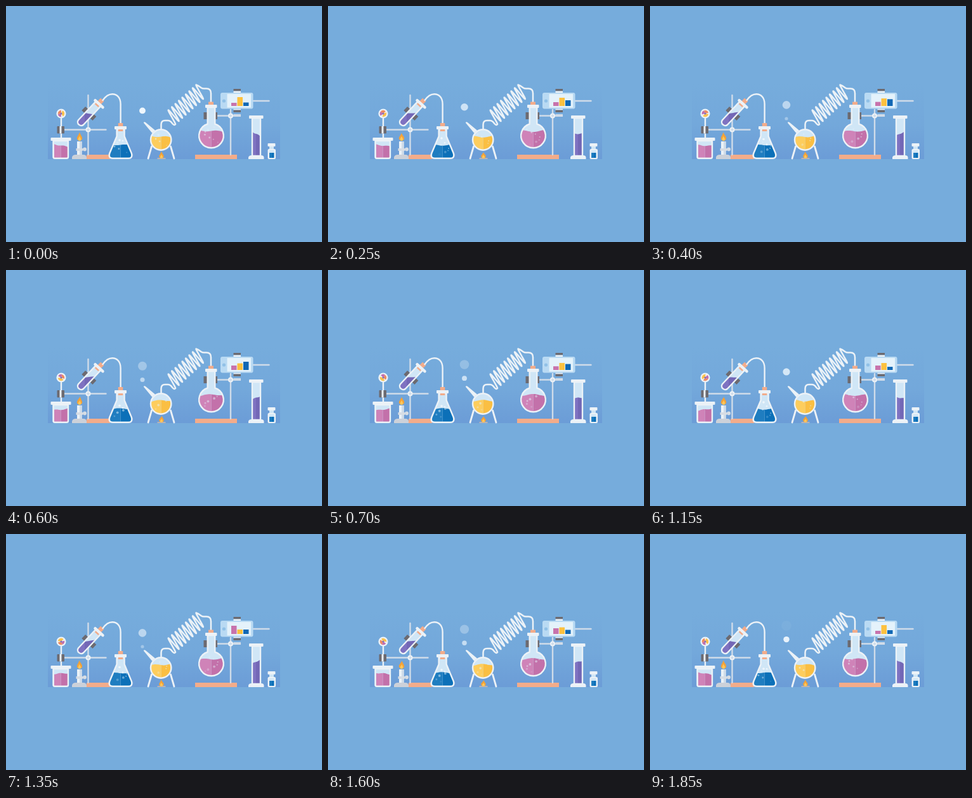
Recreate the animation shown at these times as an HTML page with a canvas. Size 498 by 373 pixels, loop 1.9 s.

```html
<!DOCTYPE html>
<html lang="en">
<head>
<meta charset="utf-8">
<title>Laboratory</title>
<style>
html, body { margin: 0; width: 100%; height: 100%; overflow: hidden; background: #76acdc; }
canvas { display: block; }
</style>
</head>
<body>
<canvas id="stage" width="498" height="373"></canvas>
<script>
const c = document.getElementById('stage').getContext('2d');
const LOOP = 1900, HALF = 950, TAU = Math.PI * 2;
const WHITE = '#ecf2f7', GLASS = '#d0e6f6', ROD = '#d0dce9', DARK = '#6c6a70', ORANGE = '#f3ac8a';
const PINK = ['#cf83b8', '#c371aa'], BLUE = ['#1f7dc0', '#0c70b8'],
  YELLOW = ['#fdcd5d', '#fabf43'], PURPLE = ['#7f72c1', '#7367b6'];

function rect(color, x, y, w, h, r = 0) {
  c.fillStyle = color;
  c.beginPath();
  c.roundRect(x, y, w, h, r);
  c.fill();
}

function disc(color, x, y, r, alpha = 1) {
  c.globalAlpha = alpha;
  c.fillStyle = color;
  c.beginPath();
  c.arc(x, y, r, 0, TAU);
  c.fill();
  c.globalAlpha = 1;
}

function shape(d, color) {
  c.fillStyle = color;
  c.fill(new Path2D(d));
}

function line(d, color = WHITE, width = 2.4, cap = 'round') {
  c.strokeStyle = color;
  c.lineWidth = width;
  c.lineCap = cap;
  c.lineJoin = 'round';
  c.stroke(new Path2D(d));
}

// Linear interpolation through [time, value] pairs, closed over the loop.
function track(t, keys) {
  const i = keys.findLastIndex(k => k[0] <= t);
  const [t0, v0] = keys[i];
  const [t1, v1] = keys[i + 1] || [LOOP, keys[0][1]];
  return v0 + (v1 - v0) * (t - t0) / (t1 - t0);
}

// Glass outline with a rocking liquid of two tones, split at the middle.
function vessel(d, t, { x0, x1, level, bottom, tones, tilt, mid = (x0 + x1) / 2, ripple = 0, bubbles = 0, period = HALF }) {
  const path = new Path2D(d), angle = TAU * t / period;
  c.fillStyle = GLASS;
  c.fill(path);
  c.save();
  c.clip(path);
  const surface = x => {
    const u = (x - x0) / (x1 - x0);
    return level + tilt * Math.cos(angle) * (u * 2 - 1) + ripple * Math.sin(u * TAU - angle);
  };
  [[x0, mid], [mid, x1]].forEach(([a, b], i) => {
    c.fillStyle = tones[i];
    c.beginPath();
    c.moveTo(a, bottom);
    for (let k = 0; k <= 10; k++) {
      const x = a + (b - a) * k / 10;
      c.lineTo(x, surface(x));
    }
    c.lineTo(b, bottom);
    c.fill();
  });
  for (let i = 0; i < bubbles; i++) {
    const p = (t / HALF + i * 0.382) % 1;
    const x = mid + (x1 - x0) * 0.28 * Math.sin(i * 2.4 + 1);
    const y = bottom - 5 - p * (bottom - level + 4);
    disc('#e5f2fb', x, y, 1 + i % 3 * 0.45, 0.5 * Math.sin(p * Math.PI));
  }
  c.restore();
  line(d);
}

function flame(x, y, h, w, t) {
  const tip = x + 0.8 * Math.sin(TAU * t / 475), top = y - h - 0.7 * Math.cos(TAU * t / 475);
  const drop = (k, color) => shape(
    `M${tip} ${y - (y - top) * k}C${x + w * k * 0.3} ${y - h * k * 0.65} ${x + w * k} ${y - h * k * 0.5} ${x + w * k * 0.8} ${y - h * k * 0.22}` +
    `Q${x} ${y + h * k * 0.16} ${x - w * k * 0.8} ${y - h * k * 0.22}C${x - w * k} ${y - h * k * 0.5} ${x - w * k * 0.3} ${y - h * k * 0.65} ${tip} ${y - (y - top) * k}`, color);
  drop(1, '#f3a238');
  drop(0.58, '#fdc75b');
}

function dial(t) {
  disc(WHITE, 87, 170, 7.6);
  const turn = TAU * t / LOOP;
  [['#c16fae', 1.6, 1.4], ['#ee8a62', 3, 1.7], ['#fbc24d', 5.1, 2.2]].forEach(([color, from, sweep]) => {
    c.fillStyle = color;
    c.beginPath();
    c.moveTo(87, 170);
    c.arc(87, 170, 5.2, from + turn, from + turn + sweep);
    c.fill();
  });
  disc('#8073c0', 87, 170, 1.6);
}

function backdrop() {
  rect('#76acdc', 0, 0, 498, 373);
  const g = c.createLinearGradient(0, 123, 0, 242);
  g.addColorStop(0, 'rgba(104,151,213,0)');
  g.addColorStop(0.55, 'rgba(104,151,213,.2)');
  g.addColorStop(1, 'rgba(104,151,213,.75)');
  rect(g, 66, 123, 366, 119);
}

function leftStand(t) {
  rect(ORANGE, 127, 235, 37, 7);
  line('M129.5 141V235M82 195.5H157.5', ROD);
  disc(WHITE, 129.5, 195.5, 4);
  disc(ROD, 129.5, 195.5, 2);

  line('M87 178V208');
  rect(DARK, 80.5, 190, 11.5, 11.5, 1);
  rect(WHITE, 84.5, 190, 3, 11.5);
  dial(t);
  vessel('M74.5 213V238.5Q74.5 240.8 77 240.8H95.5Q98 240.8 98 238.5V213Z', t,
    { x0: 76, x1: 97, level: 220.5, bottom: 240, tones: PINK, tilt: 2.2, ripple: 0.8, period: LOOP });
  rect(WHITE, 70.5, 208, 32, 5, 1);

  shape('M104 242V239Q105 235 110 235H122Q126.5 235 127 239V242Z', '#ccd1d9');
  rect(WHITE, 112, 214, 7.5, 21);
  rect(ROD, 116, 214, 3.5, 21);
  rect('#d7dde4', 110.5, 225, 10.5, 4);
  disc('#d7dde4', 124, 226.5, 3);
  flame(116, 213.5, 13.5, 5, t);

  line('M122.2 162L127.4 166.8M134 172.8L139.4 177.8', DARK, 8.5, 'butt');
  vessel('M141 151.3L114 180.3A5.5 5.5 0 0 0 122 187.7L149 158.7Z', t,
    { x0: 112, x1: 142, level: 169.5, bottom: 191, tones: PURPLE, tilt: 2.5, mid: 124 });
  line('M142.5 157.5L151.8 148', ORANGE, 7.5, 'butt');
  line('M140.5 149.2L152.5 160.2', WHITE, 4.5);
  line('M152.5 149C157 142.5 162 139.2 167.5 139.2C176 139.2 180.6 146 180.6 155V186');
}

function conical(t) {
  vessel('M174.6 195V206L163.6 232C161.5 237 163 240.8 168 240.8H193C198 240.8 199.6 237 197.5 232L186.6 206V195Z', t,
    { x0: 162, x1: 199, level: 219.5, bottom: 240, tones: BLUE, tilt: 1.6, ripple: 1.3, bubbles: 6 });
  disc('#f5fafd', 179, 212 - 3 * Math.sin(TAU * t / HALF), 1.8, 0.8);
  disc('#f5fafd', 184, 216 - 3 * Math.cos(TAU * t / HALF), 1.3, 0.7);
  rect(ORANGE, 176.8, 185, 7.5, 13);
  rect(WHITE, 171, 190, 19, 5, 1);
}

function coil() {
  let d = 'M244.5 197V187.5Q244.5 181 250.5 181H255Q259 181 262 185.5Q265 189.5 267 187';
  const turns = 8.5, steps = 170;
  for (let i = 0; i <= steps; i++) {
    const u = i / steps, swing = Math.cos(u * turns * TAU);
    d += `L${260 + 46.5 * u + 7 * swing} ${177 - 42.5 * u + 10 * swing}`;
  }
  line(d + 'Q304 126 308 129.5Q309.5 130.5 312 130.5H316Q323 130.5 323 138V153', WHITE, 2.5);
}

function yellowFlask(t) {
  line('M229.5 222L224 241M259.5 222L265 241', WHITE, 2.8);
  shape('M216.8 184.5Q217.8 182.3 220 184L235 196.5L230.5 201Z', WHITE);
  vessel('M228 211.5A16.2 16.2 0 0 1 260.4 211.5A16.2 16.2 0 0 1 228 211.5Z', t,
    { x0: 228, x1: 261, level: 206.5, bottom: 229, tones: YELLOW, tilt: 1.5, ripple: 1.3, bubbles: 5 });
  rect('#b9b3b6', 238.5, 240, 13, 2);
  flame(245, 241, 10.5, 4.5, t);
}

function rightStand(t) {
  rect(ORANGE, 298, 235, 66, 7);
  line('M354 164V235M331 173.5H369', ROD);
  disc(WHITE, 354, 173.5, 4);
  disc(ROD, 354, 173.5, 2);

  rect(DARK, 311.5, 168, 6, 11);
  rect(DARK, 329, 168, 4, 11);
  rect(ORANGE, 319, 151.5, 8, 5);
  vessel('M317.7 160V186.5A19.3 19.3 0 1 0 329.3 186.5V160Z', t,
    { x0: 304, x1: 343, level: 197.5, bottom: 225, tones: PINK, tilt: 1.8, ripple: 1.5, bubbles: 8 });
  rect(WHITE, 314, 156, 18.5, 5, 1);
}

function phone(t) {
  rect(DARK, 358.5, 131, 11.5, 3.5);
  rect(WHITE, 358.5, 134.5, 11.5, 2.5);
  rect(WHITE, 358.5, 162.5, 11.5, 2);
  rect(DARK, 358.5, 164.5, 11.5, 3.5);
  rect(ROD, 358.5, 171, 11.5, 4);
  line('M389 150H414.5', ROD);
  rect('#b9daf3', 338, 137, 51.5, 25.5, 3);
  rect('#e4f2fb', 348.5, 139, 37.5, 21.5);
  disc('#91c1e7', 343.5, 150, 2.6);
  const bars = [
    ['#c873ac', 355, [[0, 5], [250, 6], [600, 7], [850, 4], [1150, 7], [1350, 13], [1850, 5]]],
    ['#fcc13f', 364.5, [[0, 14], [250, 13], [600, 10.5], [850, 12], [1150, 11], [1350, 7], [1850, 14]]],
    ['#1168b4', 374, [[0, 5.5], [250, 9], [600, 13], [850, 4], [1150, 5], [1350, 7], [1850, 6]]]
  ];
  for (const [color, x, keys] of bars) {
    const h = track(t, keys);
    rect(color, x, 158 - h, 8.5, h);
  }
}

function cylinder(t) {
  vessel('M388 177V237H401V177Z', t,
    { x0: 388, x1: 400, level: 202, bottom: 237, tones: PURPLE, tilt: 3.2, ripple: 0.5 });
  rect(WHITE, 383, 173, 22.5, 5, 1);
  shape('M382 242V239Q383 236 387 236H402Q406 236 406.5 239V242Z', WHITE);
}

function bottle() {
  rect(WHITE, 412.5, 217, 12, 5, 1);
  rect(GLASS, 415, 222, 7, 5);
  rect(WHITE, 412.5, 226, 12.5, 16, 2);
  rect(GLASS, 415, 228, 7.5, 5);
  rect(BLUE[0], 415, 232, 4, 8);
  rect(BLUE[1], 418.7, 232, 3.8, 8);
}

// Each bubble lives about 1500 ms; a new one leaves the spout every 950 ms.
function steam(t) {
  for (const age of [t % HALF + HALF - 370, t % HALF - 370]) {
    if (age < 0 || age > 1530) continue;
    const alpha = age < 580 ? 0.35 + 0.65 * age / 580 : 1 - (age - 580) / 950;
    disc('#eff7fd', 215, 178.7 - age * 0.0228, 2.4 + 5.6 * (age / 1500) ** 0.85, alpha);
  }
}

function draw(now) {
  const t = Math.floor(now % LOOP / 50) * 50;
  backdrop();
  leftStand(t);
  conical(t);
  coil();
  yellowFlask(t);
  rightStand(t);
  phone(t);
  cylinder(t);
  bottle();
  steam(t);
}

const start = performance.now();
function tick() {
  draw(performance.now() - start);
  requestAnimationFrame(tick);
}
tick();
</script>
</body>
</html>
```
